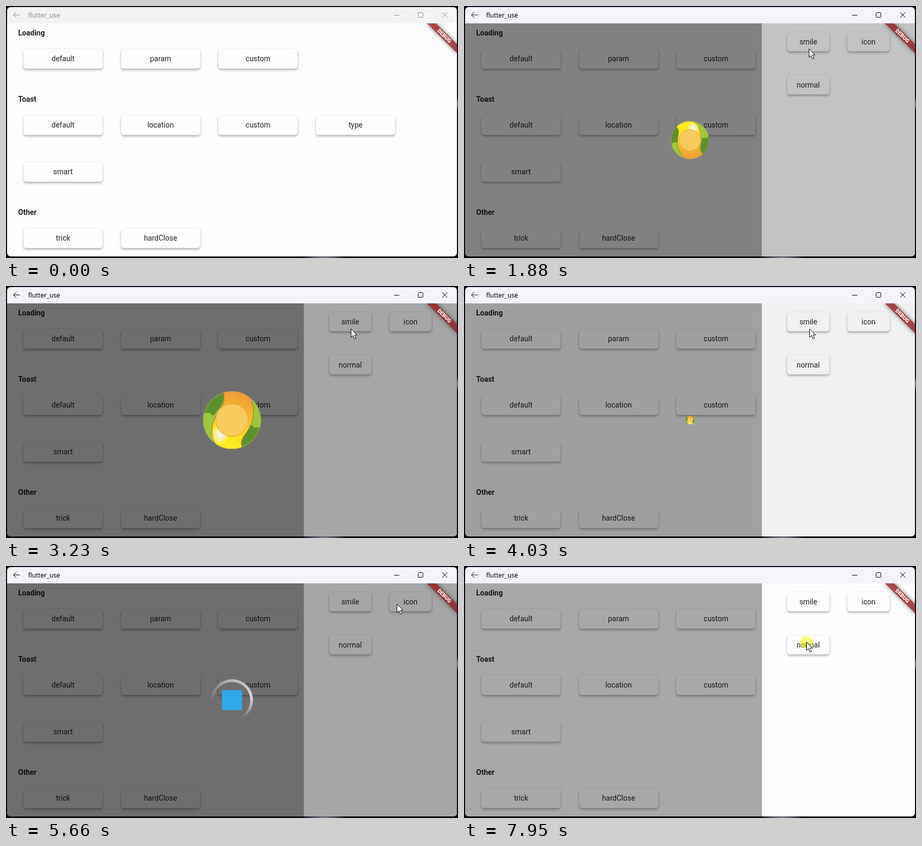
These frames come from a looping animation (856 px wide and 479 px high, 8 s). An HTML page:

```html
<!DOCTYPE html>
<html lang="en">
<head>
<meta charset="utf-8">
<title>flutter_use</title>
<style>
html, body { margin: 0; width: 856px; height: 479px; overflow: hidden; }
body {
  position: relative;
  background:
    radial-gradient(ellipse 45px 5px at 602px 479px, #9a9aa4, transparent),
    radial-gradient(ellipse 3px 14px at 856px 186px, #9a9aa8, transparent),
    #0a0512;
}
div, svg { position: absolute; }
#win { left: 2px; top: 2px; width: 852px; height: 474px; border-radius: 7px; overflow: hidden; }
#bar { width: 852px; height: 31px; }
#name { left: 40px; top: 0; font: 12px/31px "Noto Sans", sans-serif; }
#bar svg { left: 0; top: 0; fill: none; stroke: currentColor; }
#app {
  top: 31px; width: 852px; height: 443px; overflow: hidden;
  background: #fefefe; color: #212121; font: 14px Roboto, sans-serif;
}
.head { left: 21px; font-weight: 700; line-height: 20px; }
.btn {
  height: 37px; line-height: 37px; text-align: center; border-radius: 5px; background: #fefefe;
  box-shadow: 0 3px 4px rgba(0,0,0,.27), 0 0 3px rgba(0,0,0,.1);
}
#panel { width: 290px; height: 443px; background: #fefefe; }
.scrim { width: 852px; height: 443px; background: #000; }
.loader { left: 426px; top: 221.5px; }
#ball { left: -56px; top: -56px; }
#ring {
  left: -40px; top: -40px; width: 80px; height: 80px; border-radius: 50%;
  background: conic-gradient(from 265deg, transparent, #bbb 95deg, #d4d4d4 180deg, transparent 245deg);
  -webkit-mask: radial-gradient(circle, transparent 34px, #000 35px);
  mask: radial-gradient(circle, transparent 34px, #000 35px);
}
#logo { left: -19px; top: -19px; width: 38px; height: 38px; background: #2fa9e8; }
#debug {
  left: 812px; top: 28px; width: 80px; height: 12px; text-align: center;
  transform-origin: 40px -28px; transform: rotate(45deg);
  font: 900 10.2px/12px Roboto, sans-serif; color: #fff;
  background: linear-gradient(rgba(183,28,28,.63), rgba(183,28,28,.63)), rgba(0,0,0,.43);
  box-shadow: 0 0 8px rgba(0,0,0,.5);
}
#dot { left: -12px; top: -11px; width: 24px; height: 24px; border-radius: 50%; background: rgba(255,246,0,.52); }
#mouse svg { left: -1px; top: -1px; }
</style>
</head>
<body>
<div id="win">
  <div id="bar">
    <div id="name">flutter_use</div>
    <svg width="852" height="31">
      <path d="M24.5 15H12M17.5 9.5L12 15L17.5 20.5M733 15.5H743M824 10L834 20M834 10L824 20"/>
      <rect x="778.5" y="10.5" width="9" height="9" rx="1"/>
    </svg>
  </div>
  <div id="app">
    <div id="page"></div>
    <div class="scrim" id="shade"></div>
    <div id="panel"></div>
    <div class="scrim" id="veil"></div>
    <div class="loader" id="smile">
      <svg id="ball" width="112" height="112" viewBox="-56 -56 112 112">
        <defs>
          <linearGradient id="skin" x1=".6" y1="0" x2=".4" y2="1">
            <stop offset="0" stop-color="#ee9440"/>
            <stop offset=".3" stop-color="#f2b42c"/>
            <stop offset=".6" stop-color="#f8dc20"/>
            <stop offset="1" stop-color="#fff21c"/>
          </linearGradient>
          <radialGradient id="shine">
            <stop offset=".3" stop-color="#f8f4e0"/>
            <stop offset="1" stop-color="#f8f4e0" stop-opacity="0"/>
          </radialGradient>
          <clipPath id="round"><circle r="55"/></clipPath>
        </defs>
        <g id="spin" clip-path="url(#round)">
          <circle r="55" fill="#9fc63c"/>
          <path id="leaf" d="M-60 -12V-60H-18C-12 -42 -18 -30 -29 -16C-35 -6 -38 -8 -42 -14Z" fill="#5f9030"/>
          <use href="#leaf" transform="rotate(180)"/>
          <path d="M-18 -56C-10 -34 -20 -26 -30 -8C-42 14 -42 40 -18 60H24C10 38 24 32 33 14C46 -12 42 -44 20 -60Z"
            fill="url(#skin)" stroke="#b06a2c"/>
          <ellipse cx="-21" cy="25" rx="17" ry="23" fill="url(#shine)" transform="rotate(20 -21 25)"/>
          <circle r="54.5" fill="none" stroke="#a8a85c"/>
        </g>
        <circle r="31" fill="#f8cb5e" stroke="#e39a3a"/>
      </svg>
    </div>
    <div class="loader" id="icon"><div id="ring"></div><div id="logo"></div></div>
    <div id="debug">DEBUG</div>
  </div>
</div>
<div id="mouse">
  <div id="dot"></div>
  <svg width="16" height="23" viewBox="-1 -1 16 23">
    <path d="M.5 .5V16.5L4.2 13L7 19.5L9.8 18.3L7 12H12Z" fill="#fff" stroke="#000"/>
  </svg>
</div>
<script>
const LOOP = 8000, FADE = 260;
const $ = id => document.getElementById(id);
const clamp = v => Math.min(1, Math.max(0, v));
const ramp = (t, start, length = FADE) => clamp((t - start) / length);
const pulse = (t, start, end) => ramp(t, start) - ramp(t, end);
const within = (t, start, end) => t >= start && t < end;

function add(parent, cls, text, x, y, w, h) {
  const el = document.createElement('div');
  el.className = cls;
  el.textContent = text;
  el.style.cssText = `left:${x}px;top:${y}px;` + (w ? `width:${w}px;height:${h}px;line-height:${h}px` : '');
  parent.append(el);
}

[['Loading', 8], ['Toast', 134], ['Other', 349]].forEach(([text, y]) => add($('page'), 'head', text, 21, y));
[
  [49, 'default param custom'],
  [175, 'default location custom type'],
  [264, 'smart'],
  [390, 'trick hardClose']
].forEach(([y, row]) => row.split(' ').forEach((text, i) =>
  add($('page'), 'btn', text, 31 + i * 184.67, y, 150, 37)));
[['smile', 48, 17], ['icon', 162, 17], ['normal', 48, 99]].forEach(([text, x, y]) =>
  add($('panel'), 'btn', text, x, y, 80, 36));

// start, end, target x and y, optional control point
const moves = [
  [60, 690, 529, 111],
  [1110, 1420, 653, 81],
  [3850, 4030, 654, 81],
  [4250, 4760, 740, 72],
  [6950, 7810, 648, 144, 705, 67]
];
const clicks = [[730, 840], [1570, 1700], [4800, 4910], [7930, 8000]];

function pointer(t) {
  let x = 870, y = 485;
  for (const [start, end, tx, ty, cx = (x + tx) / 2, cy = (y + ty) / 2] of moves) {
    const p = ramp(t, start, end - start), s = p * p * (3 - 2 * p), r = 1 - s;
    x = r * r * x + 2 * r * s * cx + s * s * tx;
    y = r * r * y + 2 * r * s * cy + s * s * ty;
    if (p < 1) break;
  }
  return [x, y];
}

function draw(now) {
  const t = now % LOOP;
  const active = ramp(t, 770, 150);
  const grey = Math.round(138 * (1 - active));
  $('bar').style.color = `rgb(${grey},${grey},${grey})`;
  $('bar').style.background = `rgb(243,243,${243 + 7 * active})`;

  const open = ramp(t, 830);
  $('shade').style.opacity = .34 * open;
  $('panel').style.left = 852 - 290 * open + 'px';

  const smile = pulse(t, 1710, 3810), icon = pulse(t, 4920, 7020);
  $('veil').style.opacity = .35 * (smile + icon);
  $('smile').style.transform = `scale(${smile})`;
  $('icon').style.transform = `scale(${icon})`;
  $('spin').setAttribute('transform', `rotate(${(t - 3230) / 860 * 360})`);
  $('ring').style.transform = `rotate(${(t - 5660) / 800 * 360}deg)`;

  const [x, y] = pointer(t);
  $('mouse').style.transform = `translate(${Math.round(x)}px,${Math.round(y)}px)`;
  $('dot').style.visibility = clicks.some(c => within(t, ...c)) ? 'visible' : 'hidden';
}

const begin = performance.now();
function tick() {
  draw(performance.now() - begin);
  requestAnimationFrame(tick);
}
tick();
</script>
</body>
</html>
```
